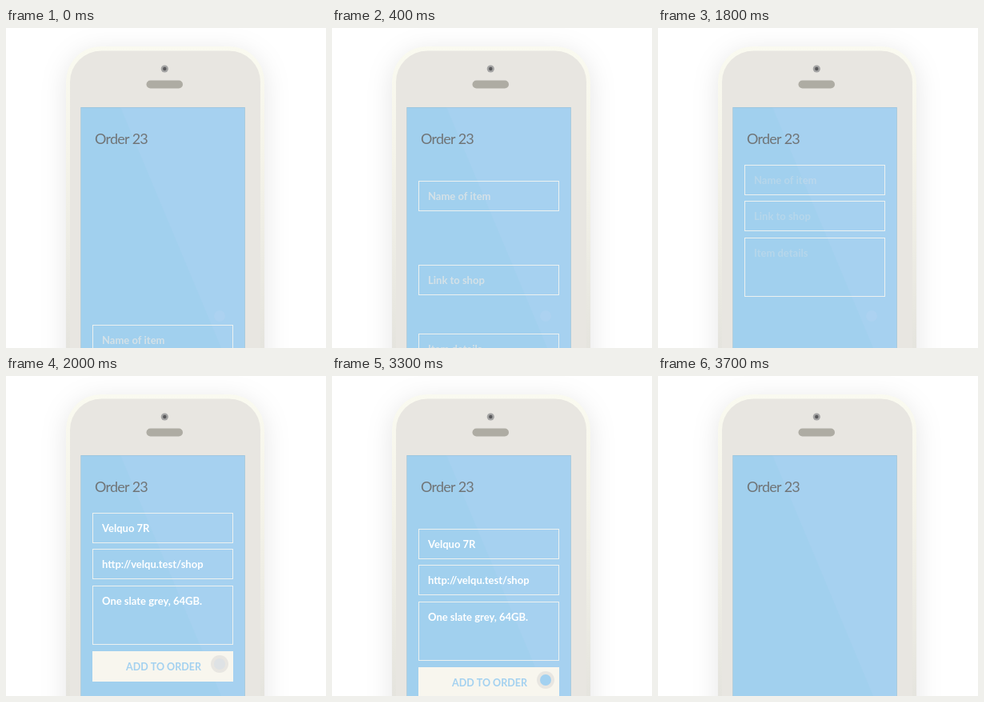
An HTML page with a canvas for the animation above (3.8 s loop, 400 by 400 pixels).

```html
<!DOCTYPE html>
<html lang="en">
<head>
<meta charset="utf-8">
<title>Order form</title>
<style>
  html, body { margin: 0; width: 100%; height: 100%; overflow: hidden; background: #fff; }
  canvas { display: block; width: 400px; height: 400px; }
</style>
</head>
<body>
<canvas width="400" height="400"></canvas>
<script>
const ctx = document.querySelector('canvas').getContext('2d');
const LOOP = 3800, STEP = 100;
const CREAM = '#f8f6ee', BODY = '#e8e6e1', BLUE = '#a3d1f0';

// Distance from rest, in pixels, for each 100 ms step.
const fields = [
  { y: 171, h: 38, label: 'Name of item', value: 'Velquo 7R', enter: [200, 150, 100, 50, 20] },
  { y: 216, h: 38, label: 'Link to shop', value: 'http://velqu.test/shop', enter: [280, 230, 180, 130, 80, 30] },
  { y: 262, h: 74, label: 'Item details', value: 'One slate grey, 64GB.', enter: [320, 270, 220, 170, 120, 85, 50] }
];
const leave = [20, 65, 120, 185, 260];

function roundRect(x, y, w, h, r, fill) {
  ctx.beginPath();
  ctx.roundRect(x, y, w, h, r);
  ctx.fillStyle = fill;
  ctx.fill();
}

function circle(x, y, r, fill) {
  ctx.beginPath();
  ctx.arc(x, y, r, 0, Math.PI * 2);
  ctx.fillStyle = fill;
  ctx.fill();
}

function text(string, x, y, font, fill, spacing = 0) {
  ctx.font = font + ' Lato, sans-serif';
  ctx.letterSpacing = spacing + 'px';
  ctx.fillStyle = fill;
  ctx.fillText(string, x, y);
}

function withAlpha(alpha, paint) {
  if (alpha <= 0) return;
  ctx.save();
  ctx.globalAlpha = alpha;
  paint();
  ctx.restore();
}

function drawPhone() {
  const rim = ctx.createLinearGradient(0, 23, 0, 400);
  rim.addColorStop(0, '#fafaf0');
  rim.addColorStop(0.35, '#f5f4ea');
  rim.addColorStop(1, '#e5e4de');
  ctx.save();
  ctx.shadowColor = 'rgba(0, 0, 0, 0.1)';
  ctx.shadowBlur = 32;
  ctx.shadowOffsetY = 6;
  roundRect(75, 23, 248, 460, 44, rim);
  ctx.restore();
  roundRect(80, 28.5, 238, 460, 39, BODY);

  circle(198.3, 51, 4.6, '#a3a3a3');
  circle(198.3, 51, 2.2, '#58585a');
  roundRect(175.5, 65.5, 45.5, 10, 5, '#aeaca3');
}

function drawScreen() {
  ctx.fillStyle = '#a1d0ee';
  ctx.fillRect(93.5, 99, 205, 301);
  ctx.beginPath();
  ctx.moveTo(143, 99);
  ctx.lineTo(298.5, 99);
  ctx.lineTo(298.5, 400);
  ctx.lineTo(269, 400);
  ctx.fillStyle = '#a6d1f0';
  ctx.fill();
  ctx.strokeStyle = 'rgba(150, 180, 195, 0.35)';
  ctx.lineWidth = 1;
  ctx.strokeRect(93.5, 99.5, 205, 310);
  text('Order 23', 111, 145, '18px', '#707476', -0.75);
}

function drawField(field, offset, labelAlpha, valueAlpha) {
  const y = field.y + offset;
  ctx.strokeStyle = 'rgba(250, 247, 240, 0.85)';
  ctx.strokeRect(108.5, y + 0.5, 175, field.h - 1);
  withAlpha(labelAlpha, () => text(field.label, 120, y + 24, 'bold 13px', '#f6ece2'));
  withAlpha(valueAlpha, () => text(field.value, 120, y + 24, 'bold 13px', '#fff'));
}

function drawButton(offset) {
  roundRect(108, 344 + offset, 176, 38, 0, CREAM);
  text('ADD TO ORDER', 150, 368 + offset, 'bold 12.5px', BLUE);
  circle(267, 360 + offset, 11, BODY);
}

function draw(time) {
  const step = Math.floor((time % LOOP) / STEP);
  const exit = step >= 33 ? leave[step - 33] : 0;
  const labelAlpha = step < 18 ? 0.6 : step === 18 ? 0.25 : 0;
  const filled = step < 19 ? 0 : step === 19 ? 0.5 : 1;

  ctx.clearRect(0, 0, 400, 400);
  drawPhone();
  drawScreen();

  ctx.save();
  ctx.beginPath();
  ctx.rect(93, 99, 206, 301);
  ctx.clip();
  for (const field of fields) {
    drawField(field, (field.enter[step] || 0) + exit, labelAlpha, filled);
  }
  withAlpha(filled, () => drawButton(exit));
  circle(267, 360 + exit, 7, step < 30 ? 'rgba(190, 216, 244, 0.25)' : BLUE);
  ctx.restore();
}

function frame() {
  draw(performance.now());
  requestAnimationFrame(frame);
}
frame();
</script>
</body>
</html>
```
